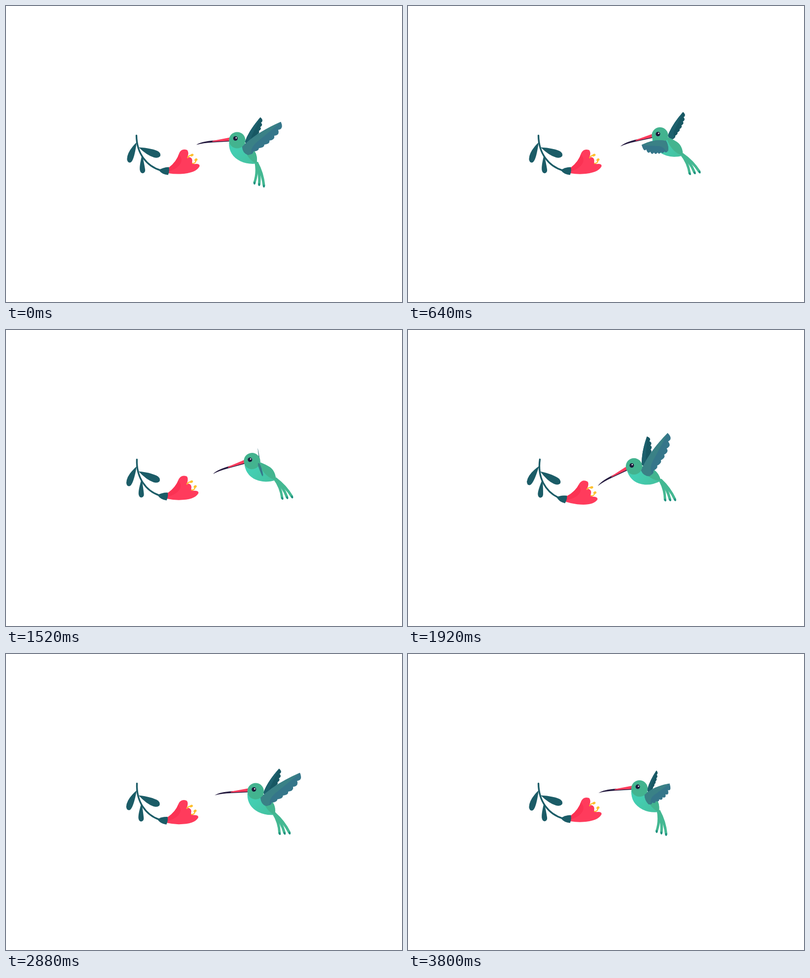
Recreate the animation shown at these times as an HTML page. Size 800 by 600 pixels, loop 3.84 s.

```html
<!DOCTYPE html>
<html lang="en">
<head>
<meta charset="utf-8">
<title>Hummingbird</title>
<style>
  html, body { margin: 0; width: 100%; height: 100%; overflow: hidden; background: #fff; }
  svg { display: block; width: 800px; height: 600px; }
</style>
</head>
<body>
<svg viewBox="0 0 800 600">
  <defs>
    <linearGradient id="belly" x1="0" y1="0" x2="1" y2="1">
      <stop offset=".3" stop-color="#43ceb2"/>
      <stop offset="1" stop-color="#45c09d"/>
    </linearGradient>
  </defs>

  <g id="plant" fill="#1b5c67">
    <path d="M263.5 262.5C264 300 285 325 312 333" fill="none" stroke="#1b5c67" stroke-width="3.4" stroke-linecap="round"/>
    <path d="M264 276Q244 296 244.5 311Q246 319 252 317Q259 313 264 276"/>
    <path d="M275 301Q269 325 270.5 333Q272 339.5 277 339Q282 337 281 331Q279 318 275 301"/>
    <path d="M268 286.5Q295 288 308 295Q314 300 311 305Q307 309 299 307Q285 303 268 286.5"/>
    <path fill="#ff3b5c" d="M329 327.5Q345 315 350 298Q355 288 366 292Q370 296 367 306Q378 306 376 317Q377 321 384 320Q392 320 391 325Q384 339 352 340.5Q340 341 328 339Z"/>
    <path fill="#f72a4e" opacity=".55" d="M329 327.5Q344 316 349 301Q360 312 349 324Q341 332 329 335Z"/>
    <path d="M367 307.5Q369 302.5 375 303M377 319Q384 319 383.5 312" fill="none" stroke="#fdc02f" stroke-width="2.2" stroke-linecap="round"/>
    <ellipse cx="375.6" cy="302.2" rx="3.4" ry="2.5" fill="#fdc02f" transform="rotate(-25 375.6 302.2)"/>
    <ellipse cx="383.8" cy="311.8" rx="3.3" ry="2.6" fill="#fdc02f" transform="rotate(-40 383.8 311.8)"/>
    <path d="M309 333Q316 327 329 326.5Q331 334 327.5 342.5Q315 341.5 309 333Z"/>
  </g>

  <g id="bird">
    <g id="farWing">
      <g transform="rotate(-56) scale(.63)">
        <path class="feathers" fill="#175763"/>
        <path class="covert" fill="#1d606d"/>
      </g>
    </g>
    <g id="tail"></g>
    <path fill="url(#belly)" d="M-13 8Q-14 34 10 46Q24 53 43 51Q46 30 33 20Q24 12 16 8Z"/>
    <path fill="#43b48f" d="M16 8Q24 12 33 20Q46 30 43 51Q23 43 16 14Z"/>
    <path fill="#241a3f" d="M-11 6L-45 8Q-66 9-79 13Q-70 6-42 4L-11 3Z"/>
    <path fill="#ff3b5c" d="M-11-2L-42 4Q-50 6-46 6.8L-11 4.5Z"/>
    <circle cx="3.5" cy="3.5" r="16.6" fill="#43b38f"/>
    <circle r="4.5" fill="#1b1a3a"/>
    <circle cx="1.5" cy="-1.1" r="1.3" fill="#fff"/>
    <g id="nearWing">
      <path class="feathers" fill="#35768a"/>
      <path class="covert" fill="#3a8186"/>
    </g>
  </g>
</svg>
<script>
const LOOP = 3840, STEP = 40;

// eye x, eye y, body angle, tail angle
const sip = [463.5, 268.5, 0, 0];
const dip = [495.5, 300, 14.5, -17];
const hover = [505, 259.5, -9, -18];
const probe = [452, 274.5, -22, 3];
const recoil = [503, 264, -5, -23];

const flight = [
  [0, sip], [280, dip], [640, hover], [1340, hover], [1920, probe],
  [2460, recoil], [2680, recoil], [3240, dip], [3360, dip], [LOOP, sip]
];

function poseAt(time) {
  const next = flight.findIndex(([t]) => t > time);
  const [t0, from] = flight[next - 1], [t1, to] = flight[next];
  const u = (time - t0) / (t1 - t0), ease = u * u * (3 - 2 * u);
  return from.map((v, i) => v + (to[i] - v) * ease);
}

// the flower is pushed down by the probing beak, then swings back
function swayAt(time) {
  const half = LOOP / 2, u = time / half;
  return 9 * (u < 1 ? u ** 5 : (2 - u) ** 1.5);
}

// wing spread: 1 is swept back, negative is swept forward
function spreadAt(time) {
  const lag = Math.PI * Math.exp(-(((time - 3240) / 250) ** 2));
  const a = time / 240 * 2 * Math.PI - lag;
  return .17 + .83 * Math.cos(a) + .15 * Math.sin(a) - .19 * Math.sin(2 * a);
}

function buildWings() {
  const length = 92, width = 22, count = 7;
  const lead = `M-1 2Q36-8 ${length}-1`, root = `Q-7 13-1 2Z`;
  let scallops = '';
  for (let i = count - 1; i >= 0; i--) {
    const x = length * i / count, y = width * (1 - (i / count) ** 4);
    scallops += `Q${x + 11} ${y + 5} ${x} ${y}`;
  }
  const shape = (name, d) =>
    document.querySelectorAll('.' + name).forEach(path => path.setAttribute('d', d));
  shape('feathers', lead + scallops + root);
  shape('covert', lead + `Q60 5 30 9Q13 12 9 21Q4 25 0 ${width}` + root);
}

function buildTail() {
  let svg = '';
  for (let i = 0; i < 3; i++) {
    const x = 9.5 * i - 3, y = 41 + 3 * i;
    svg += `<path fill="#44b892" d="M-3-3Q${x / 2 + 3} ${y * .45} ${x - 2.6} ${y - 2}
      Q${x} ${y + 6} ${x + 2.6} ${y - 2}Q${x / 2 + 8} ${y * .4} 4-3Z"/>
      <ellipse cx="${x}" cy="${y - 1}" rx="2" ry="2.8" fill="#1f9080"/>`;
  }
  document.getElementById('tail').innerHTML = svg;
}

const place = (id, transform) => document.getElementById(id).setAttribute('transform', transform);

function draw(time) {
  const [x, y, tilt, tail] = poseAt(time);
  const spread = spreadAt(time), forward = Math.max(-spread, 0);
  const far = Math.min(1, spread < 0 ? forward * 1.8 : spread);
  const swing = -8 - 23 * Math.max(spread, -.2);

  place('plant', `rotate(${swayAt(time)} 266 281)`);
  place('bird', `translate(${x} ${y}) rotate(${tilt})`);
  place('tail', `translate(41.5 50.5) rotate(${tail})`);
  place('farWing', `translate(18.5 5.5) rotate(${forward * 18}) scale(${far} ${.5 + far / 2})`);
  place('nearWing', `translate(13.5 14.5) rotate(${swing}) scale(${spread} 1)`);
}

function tick() {
  const time = performance.now() % LOOP;
  draw(Math.floor(time / STEP) * STEP);
  requestAnimationFrame(tick);
}

buildWings();
buildTail();
tick();
</script>
</body>
</html>
```
